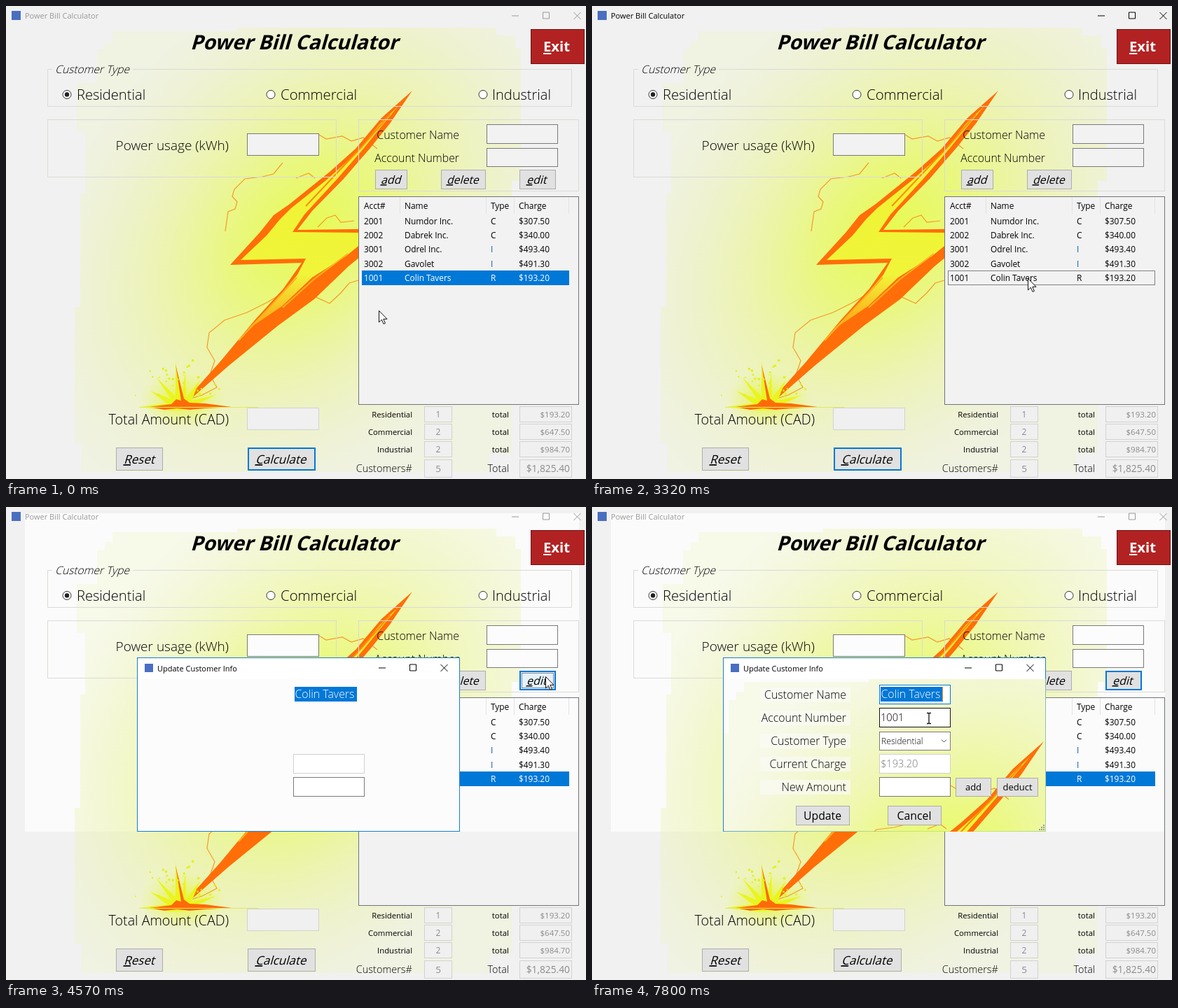
Write an HTML page that moves like this. It is 828 px wide and 676 px high and loops after 8000 ms.

```html
<!DOCTYPE html>
<html lang="en">
<head>
<meta charset="utf-8">
<title>Power Bill Calculator</title>
<style>
  html, body { margin: 0; width: 100%; height: 100%; overflow: hidden; background: #f1f1f1; }
  svg { display: block; width: 828px; height: 676px; --box: #f2f2f2; --bar: #000;
        font-family: "Open Sans", "Noto Sans", sans-serif; }
  text { white-space: pre; }
  .u { text-decoration: underline; }
  .bar { fill: var(--bar); }
  .ctl { fill: none; stroke: var(--bar); }
  #dialog { --bar: #000; --box: #fff; }
</style>
</head>
<body>
<svg id="stage" viewBox="0 0 828 676">
  <defs>
    <radialGradient id="glow">
      <stop offset="0" stop-color="#e6fb3c" stop-opacity=".9"/>
      <stop offset=".28" stop-color="#e7f95e" stop-opacity=".74"/>
      <stop offset=".55" stop-color="#e8f57c" stop-opacity=".45"/>
      <stop offset=".8" stop-color="#eaf298" stop-opacity=".2"/>
      <stop offset="1" stop-color="#ebf3b0" stop-opacity="0"/>
    </radialGradient>
    <radialGradient id="flash">
      <stop offset="0" stop-color="#e6f520" stop-opacity=".9"/>
      <stop offset="1" stop-color="#e6f560" stop-opacity="0"/>
    </radialGradient>
    <linearGradient id="fire" x1="0" y1="0" x2="0" y2="1">
      <stop offset="0" stop-color="#f8d820"/>
      <stop offset=".25" stop-color="#f0f332"/>
      <stop offset=".75" stop-color="#f0f53a"/>
      <stop offset="1" stop-color="#ffa012"/>
    </linearGradient>
    <clipPath id="haze">
      <path d="M130 62H141V50H152V36H330V31H700V42H727V60H735V250H722V640H690V666H108V625H98V430H106V268H113V180H101V110H130Z"/>
    </clipPath>
    <clipPath id="client"><path d="M188 246H648V464H188Z"/></clipPath>
  </defs>
</svg>
<script>
const stage = document.getElementById('stage');
const rect = (x, y, r, b, fill = 'none', stroke = 'none', more = '') =>
  `<rect x="${x}" y="${y}" width="${r - x}" height="${b - y}" fill="${fill}" stroke="${stroke}" ${more}/>`;
const line = (d, color, w = 1, more = '') =>
  `<path d="${d}" fill="none" stroke="${color}" stroke-width="${w}" ${more}/>`;
const group = (id, body, more = '') => `<g id="${id}" ${more}>${body}</g>`;

// "&" marks the underlined access key
function text(x, y, s, size, { anchor = 'start', weight = 400, fill = '', slant = 0, cls = '' } = {}) {
  const body = s.replace(/&(.)/, '<tspan class="u">$1</tspan>');
  return `<text transform="translate(${x} ${y}) skewX(${-slant})" font-size="${size}" font-weight="${weight}"
    text-anchor="${anchor}" class="${cls}" ${fill && `fill="${fill}"`}>${body}</text>`;
}
const label = (x, y, s, size, anchor = 'end') => text(x, y, s, size, { anchor, weight: 300 });
const box = (x, y, r, b, stroke = '#7a7a7a', more = '') =>
  rect(x + .5, y + .5, r - .5, b - .5, 'var(--box)', stroke, more);
const button = (x, y, r, b, id = '') =>
  rect(x + .5, y + .5, r - .5, b - .5, '#e1e1e1', '#adadad', id && `id="${id}"`);
const ring = (x, y, r, b, id) =>
  rect(x + 1, y + 1, r - 1, b - 1, 'none', '#0078d7', `stroke-width="2" id="${id}"`);
const frame = (x, y, r, b) => rect(x + .5, y + .5, r + .5, b + .5, 'none', '#dadad6');
const controls = (x, y) =>
  `<path class="ctl" d="M${x} ${y + .5}h10M${x + 44.5} ${y - 4.5}h9v9h-9zM${x + 88.5} ${y - 4.5}l10 10m0 -10l-10 10"/>`;

function sparks() {
  let seed = 7, out = '';
  const rnd = () => (seed = seed * 16807 % 2147483647) / 2147483647;
  for (let i = 0; i < 28; i++) {
    const a = Math.PI * (1.05 + .9 * rnd()), d = 22 + 50 * rnd();
    out += `<circle cx="${252 + d * Math.cos(a)}" cy="${566 + d * Math.sin(a) * .9}" r="${.6 + 1.4 * rnd()}" fill="#e2f01c"/>`;
  }
  return out;
}

const scene = group('scene', `
  <g clip-path="url(#haze)">
    <rect width="828" height="676" fill="#ebf0bc" opacity=".3"/>
    <ellipse rx="445" ry="325" fill="url(#glow)" transform="translate(425 325) rotate(-48)"/>
  </g>
  <ellipse cx="252" cy="563" rx="62" ry="42" fill="url(#flash)"/>
  ${line('M395 224L382 240 366 244 341 247 326 262 323 272 330 280 327 290 317 294 313 322M447 184L457 190 480 186 493 193 510 188 530 204M414 246L432 239 441 246M445 316L458 303 470 299 478 309 497 307M503 392L490 396 478 410 462 425 442 416 421 421M404 405L372 424 344 438 312 449 290 467 287 488 298 507 291 527 301 545 280 556 264 561', '#f79a28', 1.2)}
  <path d="M580 121L536 160 499 204 462 237 405 283 382 299 362 324 320 370 422 367 396 404 355 449 306 508 255 565 262 563 318 514 388 457 440 419 489 372 555 318 416 320 437 293 482 247 520 203 548 168Z" fill="#ff6e08"/>
  <path d="M560 143L534 168 502 209 457 249 407 289 391 305 372 328 335 363 428 361 416 384 382 424 344 463 394 429 437 388 486 357 503 343 506 324 409 323 426 298 472 248 511 203 536 172Z" fill="url(#fire)"/>
  ${line('M415 388L374 433 332 478M488 354L439 391 395 431', '#ffb21c', 2)}
  ${line('M548 155L508 201 428 286', '#ff8a10', 2)}
  <path d="M250 566L242 508 242 558 214 530 236 562 206 550 230 568 190 573 235 578 310 574 274 568 300 556 265 564 277 534 257 561 256 522Z" fill="#e9f51c"/>
  <path d="M205 573L236 569 243 562 250 564 242 512 254 561 262 567 284 568 322 573 284 575 262 577 244 575 226 577Z" fill="#ff6a08"/>
  ${line('M190 573.5H360', '#e0e860')}${sparks()}`);

const radio = x => `<circle cx="${x}" cy="126.5" r="6" fill="#fff" stroke="#333"/>`;
const slanted = (x, y, s, size) => text(x, y, s, size, { slant: 16 });

const header = text(27, 18, 'Power Bill Calculator', 11, { cls: 'bar' }) + controls(722, 13.5) +
  rect(8, 7, 21, 20, '#4a6fc0') +
  text(263, 62, 'Power Bill Calculator', 28.6, { weight: 700, slant: 16 }) +
  rect(749.5, 33.5, 825.5, 82.5, '#b22222', '#701414') +
  text(767, 65, '&Exit', 20.3, { weight: 700, fill: '#fff' }) +
  line('M66 90.5H59.5V143.5H807.5V90.5H181', '#dadad6') +
  text(70, 96, 'Customer Type', 15.6, { weight: 300, slant: 16 }) +
  radio(87) + '<circle cx="87" cy="126.5" r="3.2" fill="#222"/>' + radio(378) + radio(681) +
  label(101, 134, 'Residential', 20.1, 'start') +
  label(392, 134, 'Commercial', 20.4, 'start') +
  label(694, 134, 'Industrial', 20, 'start');

const left = frame(59, 162, 471, 244) + label(318, 206, 'Power usage (kWh)', 19) +
  box(344, 182, 447, 214) + label(318, 598, 'Total Amount (CAD)', 19.7) +
  rect(344.5, 574.5, 446.5, 605.5, '#f0f0f0', '#d2d2d2') +
  button(157, 631, 224, 664) + slanted(168, 654, '&Reset', 17) +
  button(345, 631, 442, 664) + ring(345, 631, 442, 664, 'calcRing') + slanted(356, 654, '&Calculate', 17);

const right = frame(503, 162, 817, 264) +
  label(647, 190, 'Customer Name', 16) + label(647, 223, 'Account Number', 15.8) +
  box(686, 169, 788, 197) + box(686, 203, 788, 230) +
  button(527, 234, 573, 262) + slanted(535, 254, '&add', 15.9) +
  button(621, 234, 685, 262) + slanted(629, 254, '&delete', 15.7) +
  group('edit', button(733, 234, 785, 262, 'editBox') + ring(733, 234, 785, 262, 'editRing') +
    rect(736.5, 237.5, 781.5, 258.5, 'none', '#222', 'id="editDots" stroke-dasharray="1"') +
    slanted(743, 254, '&edit', 15.9));

const cols = [511, 569, 692, 732];
const row = (y, cells) => cells.map((s, i) =>
  text(cols[i], y, s, 11.9, { fill: s === 'I' ? '#0a5ab4' : '' })).join('');
const list = rect(503.5, 272.5, 817.5, 569.5, '#f2f2f2', '#70757a') +
  rect(504, 273, 817, 464, '#fbfbfb', 'none', 'id="listLight"') +
  line('M562.5 273V297M685.5 273V297M725.5 273V297M803.5 273V297', '#e2e2e2') +
  row(289.5, ['Acct#', 'Name', 'Type', 'Charge']) +
  row(311.5, ['2001', 'Numdor Inc.', 'C', '$307.50']) +
  row(332, ['2002', 'Dabrek Inc.', 'C', '$340.00']) +
  row(352.3, ['3001', 'Odrel Inc.', 'I', '$493.40']) +
  row(372.6, ['3002', 'Gavolet', 'I', '$491.30']) +
  rect(508, 378, 804, 399, '#0078d7', 'none', 'id="mark"') +
  rect(508.5, 378.5, 803.5, 398.5, 'none', '#111', 'id="dots" stroke-dasharray="1"') +
  group('row', row(393, ['1001', 'Colin Tavers', 'R', '$193.20']));

const sums = [
  ['Residential', 1, 'total', '$193.20', 572, 595], ['Commercial', 2, 'total', '$647.50', 597, 620],
  ['Industrial', 2, 'total', '$984.70', 622, 645], ['Customers#', 5, 'Total', '$1,825.40', 648, 674],
].map(([kind, n, word, sum, y, b], i) => {
  const last = i === 3, base = last ? 666 : y + 16;
  const dark = { anchor: 'end', weight: last ? 300 : 400 }, pale = { fill: '#8a8a8a' };
  return text(580, base, kind, last ? 14.5 : 11.3, dark) + text(718, base, word, last ? 14.3 : 11.5, dark) +
    rect(597.5, y + .5, 636.5, b - .5, '#f0f0f0', '#d2d2d2') + rect(733.5, y + .5, 807.5, b - .5, '#f0f0f0', '#d2d2d2') +
    text(617, base, '' + n, last ? 13.5 : 12, { ...pale, anchor: 'middle' }) +
    text(805, base, sum, last ? 13.8 : 11.5, { ...pale, anchor: 'end' });
}).join('');

const form = ['Customer Name', 'Account Number', 'Customer Type', 'Current Charge', 'New Amount']
  .map((s, i) => rect(240, 258 + 33 * i, 369, 279 + 33 * i, '#fbfbf6', 'none', 'opacity=".7"') +
    label(363, 274 + 33 * i, s, 15.9)).join('');
const small = (x, r, s) => button(x, 387, r, 414) + text((x + r) / 2, 405, s, 13, { anchor: 'middle' });
const big = (x, s) => button(x, 427, x + 77, 455) + text(x + 38, 447, s, 15.8, { anchor: 'middle' });
let grip = '';
for (let i = 0; i < 3; i++) for (let j = 0; j <= i; j++) grip += `M${644 - 3 * j} ${455 + 3 * i}h2`;

const dialog = group('dialog',
  rect(187.5, 215.5, 647.5, 463.5, '#fcfcfc', '#1a7fd0') +
  group('backdrop', '<g clip-path="url(#client)"><use href="#scene" x="65" y="214"/></g>') +
  rect(188, 216, 647, 246, '#fff') + rect(198, 224, 210, 236, '#4a6fc0') +
  text(216, 234.5, 'Update Customer Info', 11) + controls(532, 229.5) +
  group('form', form + box(410, 254, 512, 282, '#0078d7') + box(410, 287, 512, 315, '#7a7a7a', 'id="acct"') +
    text(412, 306, '1001', 14.6, { weight: 300 }) +
    box(410, 321, 512, 348) + label(413, 339, 'Residential', 12.2, 'start') +
    line('M499 332.5l3.5 3.5 3.5 -3.5', '#444') +
    small(519, 570, 'add') + small(578, 637, 'deduct') + big(291, 'Update') + big(422, 'Cancel') +
    line(grip, '#999', 2)) +
  box(410, 353, 512, 381, '#d0d0d0') + box(410, 386, 512, 414) +
  group('charge', text(412, 372, '$193.20', 14.6, { weight: 300, fill: '#777' })) +
  rect(412, 257, 501, 278, '#0078d7') +
  text(412.5, 273, 'Colin Tavers', 15.9, { weight: 300, fill: '#fff' }) +
  line('M500.5 257V277', '#ff872a', 1, 'id="caret"'));

stage.innerHTML += '<rect width="828" height="676" fill="#f1f1f1"/>' +
  rect(27, 9, 818, 464, '#fbfbfb', 'none', 'id="light"') +
  scene + header + left + right + list + sums + dialog +
  '<path id="arrow" d="M.5 .5V17L4.4 13.3 7 19.4 9.4 18.4 6.8 12.4H12Z" fill="#fff" stroke="#111"/>' +
  line('M-3 -7.5H-1Q0 -7.5 0 -6.5Q0 -7.5 1 -7.5H3M0 -7V7M-3 7.5H-1Q0 7.5 0 6.5Q0 7.5 1 7.5H3', '#111', 1.3, 'id="beam"');

// pointer: time, x, y, held until the next entry
const moves = [
  [0, 532, 435], [120, 640, 453], [240, 687, 447], [520, 670, 467], [950, 660, 455], [1100, 651, 442],
  [1380, 615, 424], [1520, 590, 404], [1650, 581, 394], [1930, 581, 391], [2640, 600, 415],
  [2760, 618, 433], [3040, 620, 415], [3180, 622, 396], [3320, 622, 389], [3600, 650, 376],
  [3740, 695, 325], [3880, 742, 270], [4020, 770, 242], [5300, 745, 250], [5440, 690, 272],
  [5570, 630, 298], [5700, 570, 320], [5830, 525, 330], [5960, 511, 331], [6110, 507, 331],
  [6270, 505, 330], [6410, 496, 318], [6550, 486, 307], [6710, 481, 302],
];
const $ = id => document.getElementById(id);
const show = (id, on) => $(id).setAttribute('display', on ? 'inline' : 'none');
const paint = (id, attrs) => Object.entries(attrs).forEach(([k, v]) => $(id).setAttribute(k, v));
const within = (t, a, b) => t >= a && t < b;

function draw(t) {
  const [, x, y] = moves.findLast(m => m[0] <= t);
  const beam = t >= 6550, open = t >= 4570, ready = t >= 4710;
  const picked = t < 800 || within(t, 2360, 2760) || t >= 3460;
  for (const id of ['arrow', 'beam']) paint(id, { transform: `translate(${x} ${y})` });
  show('arrow', !beam);
  show('beam', beam);

  for (const id of ['mark', 'edit']) show(id, picked);
  show('dots', !picked);
  paint('row', { fill: picked ? '#fff' : '#000' });
  const hot = within(t, 4020, 5300), armed = t >= 4450;
  paint('editBox', { fill: hot ? '#e5f1fb' : '#e1e1e1', stroke: t >= 4020 ? '#0078d7' : '#adadad' });
  show('editRing', armed);
  show('editDots', within(t, 4450, 5300));
  show('calcRing', !armed);

  for (const id of ['dialog', 'light', 'listLight']) show(id, open);
  for (const id of ['form', 'backdrop', 'charge']) show(id, ready);
  stage.style.setProperty('--box', open ? '#fcfcfc' : '#f2f2f2');
  stage.style.setProperty('--bar', t < 800 || open ? '#999' : '#000');
  paint('acct', { stroke: beam ? '#111' : '#7a7a7a' });
  show('caret', within(t, 5650, 6180) || within(t, 6710, 7240) || t >= 7800);
}

const start = performance.now();
function tick(now) {
  draw(Math.max(0, now - start) % 8000);
  requestAnimationFrame(tick);
}
draw(0);
requestAnimationFrame(tick);
</script>
</body>
</html>
```
